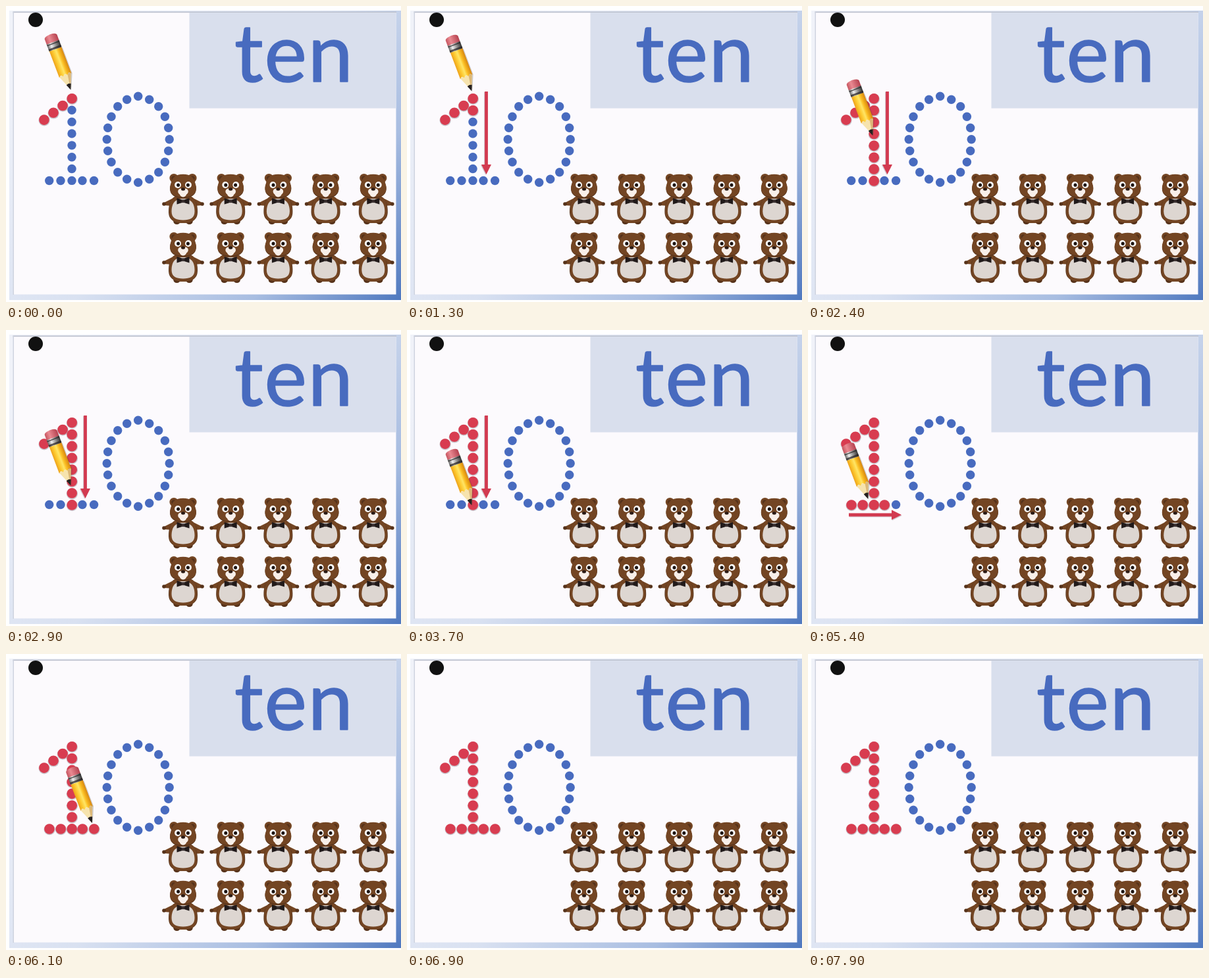
An HTML page with a canvas that plays this animation: 600 by 450 pixels, repeating every 8000 ms.

```html
<!DOCTYPE html>
<html lang="en">
<head>
<meta charset="utf-8">
<title>Writing the number ten</title>
<style>
  html, body { margin: 0; width: 100%; height: 100%; overflow: hidden; background: #fff; }
  canvas { display: block; width: 600px; height: 450px; }
</style>
</head>
<body>
<canvas id="stage"></canvas>
<script>
const W = 600, H = 450, LOOP = 8000;
const BLUE = '#486bbf', RED = '#d83c50', BROWN = '#734523', DARK = '#56321a';
const canvas = document.getElementById('stage');
const dpr = window.devicePixelRatio || 1;
canvas.width = W * dpr;
canvas.height = H * dpr;
const ctx = canvas.getContext('2d');

const clamp = v => Math.min(1, Math.max(0, v));
const span = (t, a, b) => clamp((t - a) / (b - a));
const smooth = p => (1 - Math.cos(Math.PI * p)) / 2;

function oval(c, x, y, rx, ry, fill) {
  c.fillStyle = fill;
  c.beginPath();
  c.ellipse(x, y, rx, ry, 0, 0, Math.PI * 2);
  c.fill();
}

function poly(c, fill, ...pts) {
  c.fillStyle = fill;
  c.beginPath();
  pts.forEach(([x, y]) => c.lineTo(x, y));
  c.closePath();
  c.fill();
}

function ramp(c, x0, y0, x1, y1, ...stops) {
  const g = c.createLinearGradient(x0, y0, x1, y1);
  stops.forEach(([p, col]) => g.addColorStop(p, col));
  return g;
}

// Dots of the digit 1; "on" is when a dot turns red
const one = [];
for (let i = 0; i < 4; i++) one.push({ x: 57.7 + 14.1 * i, y: 172.6 - 10.8 * i, on: 0 });
for (let i = 0; i < 7; i++) one.push({ x: 100, y: 158.3 + 17.85 * i, on: 1200 + 170 * i });
[65.7, 83, 116, 133.6].forEach((x, i) =>
  one.push({ x, y: 265.5, on: i ? 4900 + 170 * i : 4400 }));

// One quarter of the digit 0, mirrored both ways
const quarter = [[0, 65.5], [17, 60.5], [31, 50], [40.7, 34.5], [46, 17.5], [47.5, 0]];

function blueDot(c, x, y) { oval(c, x, y, 6.7, 6.7, BLUE); }

function redDot(c, x, y) {
  oval(c, x + .4, y + 1.4, 8.6, 8.4, 'rgba(70,60,80,.28)');
  oval(c, x + .2, y + .5, 7.8, 7.8, RED);
}

// Pear: narrow shoulders of half-width a at the top, half-width b below
function pear(c, top, bottom, a, b, fill) {
  const h = bottom - top;
  c.fillStyle = fill;
  c.beginPath();
  c.moveTo(0, top);
  c.bezierCurveTo(a, top, b, top + h * .25, b, top + h * .6);
  c.bezierCurveTo(b, top + h * .9, b * .6, bottom, 0, bottom);
  c.bezierCurveTo(-b * .6, bottom, -b, top + h * .9, -b, top + h * .6);
  c.bezierCurveTo(-b, top + h * .25, -a, top, 0, top);
  c.fill();
}

function bear(c, x, y) {
  c.save();
  c.translate(x, y);
  c.lineCap = 'round';
  for (const s of [-1, 1]) {
    oval(c, s * 9.5, 73.5, 5.2, 4.6, DARK);
    poly(c, BROWN, [s * 10, 37], [s * 16, 38.5], [s * 28, 44.5], [s * 29, 49], [s * 16, 50]);
    oval(c, s * 29, 47, 2.8, 2.8, DARK);
    oval(c, s * 14, 7.5, 6.6, 6.6, BROWN);
    oval(c, s * 14.2, 7.8, 3.6, 3.6, DARK);
  }
  pear(c, 33, 76, 17, 22, DARK);
  pear(c, 33, 76, 18, 21.2, BROWN);
  pear(c, 39, 71.5, 13, 17.5, '#ddd6d1');

  // Broad-cheeked head with a shaded lower rim
  for (const [dy, fill] of [[0, DARK], [-1.3, BROWN]]) {
    c.fillStyle = fill;
    c.beginPath();
    c.moveTo(0, 3 + dy);
    c.bezierCurveTo(12, 3 + dy, 17, 9 + dy, 18.5, 17 + dy);
    c.bezierCurveTo(22, 26 + dy, 20, 38 + dy, 0, 38 + dy);
    c.bezierCurveTo(-20, 38 + dy, -22, 26 + dy, -18.5, 17 + dy);
    c.bezierCurveTo(-17, 9 + dy, -12, 3 + dy, 0, 3 + dy);
    c.fill();
  }
  for (const s of [-1, 1]) {
    oval(c, s * 8, 18, 4.9, 4.9, '#fff');
    oval(c, s * 7.4, 18.2, 2.5, 2.6, '#1e1512');
    oval(c, s * 3.2, 28, 4.6, 4.6, '#f8efe9');
  }
  oval(c, 0, 31, 5.4, 5.4, '#f8efe9');
  oval(c, 0, 24.5, 3, 2.2, '#2a1a14');
  poly(c, '#211a1a', [-9.5, 38], [0, 41], [9.5, 38], [9.5, 47.5], [0, 44.5], [-9.5, 47.5]);
  oval(c, 0, 42.7, 2.5, 2.5, '#3a3030');
  c.restore();
}

// Everything that never changes, drawn once
function backdrop() {
  const layer = document.createElement('canvas');
  layer.width = canvas.width;
  layer.height = canvas.height;
  const c = layer.getContext('2d');
  c.scale(dpr, dpr);
  c.fillStyle = '#fff';
  c.fillRect(0, 0, W, H);
  c.fillStyle = ramp(c, 90, 0, 600, 447,
    [0, '#f0f2f9'], [.45, '#d9e1f1'], [.75, '#a8bde1'], [1, '#4f78bf']);
  c.fillRect(5, 7, 595, 440);
  c.fillStyle = '#bcc1ce';
  c.fillRect(10.5, 8.5, 582.5, 2);
  c.fillStyle = '#cfd4e0';
  c.fillRect(10.5, 8.5, 1.5, 430.5);
  c.fillStyle = '#fcfafd';
  c.fillRect(12, 10.3, 580.5, 428.2);
  c.fillStyle = '#d9dfed';
  c.fillRect(278.5, 10, 314, 145.5);

  c.font = '122px Lato, "Open Sans", sans-serif';
  c.letterSpacing = '2px';
  c.fillStyle = c.strokeStyle = BLUE;
  c.lineWidth = 1.6;
  c.lineJoin = 'round';
  const left = 349 + c.measureText('ten').actualBoundingBoxLeft;
  c.fillText('ten', left, 114.5);
  c.strokeText('ten', left, 114.5);

  oval(c, 45, 21, 11, 11, '#111');

  quarter.forEach(([dx, dy]) => {
    for (const sx of dx ? [-1, 1] : [1])
      for (const sy of dy ? [-1, 1] : [1]) blueDot(c, 200.7 + sx * dx, 202.7 + sy * dy);
  });
  for (let r = 0; r < 2; r++)
    for (let k = 0; k < 5; k++) bear(c, 269 + 72.2 * k, 254 + 89 * r);
  return layer;
}

// Arrow along +x, revealed by a soft-edged wipe
function arrow(x, y, angle, len, p) {
  if (p <= 0) return;
  ctx.save();
  ctx.translate(x, y);
  ctx.rotate(angle);
  const edge = p * (len + 14);
  const wipe = rgb => ramp(ctx, edge - 14, 0, edge, 0, [0, `rgba(${rgb},1)`], [1, `rgba(${rgb},0)`]);
  const shape = [[0, -2.4], [len - 15, -2.4], [len - 15, -7.5], [len, 0],
    [len - 15, 7.5], [len - 15, 2.4], [0, 2.4]];
  ctx.globalAlpha = .25;
  poly(ctx, wipe('90,60,80'), ...shape.map(([a, b]) => [a + .8, b + 1.2]));
  ctx.globalAlpha = 1;
  poly(ctx, wipe('210,58,80'), ...shape);
  ctx.restore();
}

// Pencil with its tip at (x, y); the local axis runs up from the tip
function pencil(x, y) {
  ctx.save();
  ctx.translate(x, y);
  ctx.rotate(-.36);
  poly(ctx, 'rgba(70,60,50,.25)', [1, 1], [11, -22], [11, -64], [8, -64]);

  poly(ctx, '#f6e3ae', [0, 0], [-9.8, -24], [9.8, -24]);
  poly(ctx, '#dcb878', [0, 0], [4, -24], [9.8, -24]);
  poly(ctx, '#25201f', [0, 1], [-3.7, -8], [0, -9], [3.7, -8]);

  ctx.fillStyle = ramp(ctx, -9.8, 0, 9.8, 0, [0, '#eda21c'], [.25, '#fdc92f'],
    [.5, '#ffe566'], [.68, '#fbbf24'], [1, '#d8860e']);
  ctx.beginPath();
  ctx.moveTo(-9.8, -66);
  ctx.lineTo(-9.8, -22);
  ctx.quadraticCurveTo(-6.5, -27, -3.5, -22);
  ctx.quadraticCurveTo(0, -27, 3.5, -22);
  ctx.quadraticCurveTo(6.5, -27, 9.8, -22);
  ctx.lineTo(9.8, -66);
  ctx.fill();

  ctx.fillStyle = ramp(ctx, -10, 0, 10, 0, [0, '#666'], [.3, '#eee'], [.6, '#999'], [1, '#333']);
  ctx.fillRect(-10, -77, 20, 12);
  ctx.fillStyle = 'rgba(35,30,30,.7)';
  ctx.fillRect(-10, -75, 20, 1.6);
  ctx.fillRect(-10, -68.5, 20, 3);

  ctx.fillStyle = ramp(ctx, -10, 0, 10, 0, [0, '#c65560'], [.35, '#ea8a92'], [1, '#b5414f']);
  ctx.beginPath();
  ctx.moveTo(-10, -76.5);
  ctx.lineTo(-10, -85);
  ctx.quadraticCurveTo(-9.5, -88.5, 0, -89);
  ctx.quadraticCurveTo(9.5, -88.5, 10, -85);
  ctx.lineTo(10, -76.5);
  ctx.fill();
  ctx.restore();
}

const scene = backdrop();

function draw(t) {
  ctx.setTransform(1, 0, 0, 1, 0, 0);
  ctx.drawImage(scene, 0, 0);
  ctx.scale(dpr, dpr);

  one.forEach(d => (t >= d.on ? redDot : blueDot)(ctx, d.x, d.y));

  if (t < 4000) arrow(120.5, 130, Math.PI / 2, 126, span(t, 300, 800));
  else if (t < 6050) arrow(62, 281, 0, 80, span(t, 4350, 4850));

  if (t < 4000) pencil(98, 126.5 + 139 * smooth(span(t, 1100, 3700)));
  else if (t >= 4250 && t < 6500) pencil(60.5 + 70 * smooth(span(t, 4850, 6050)), 256);
}

const start = performance.now();
function tick() {
  draw((performance.now() - start) % LOOP);
  requestAnimationFrame(tick);
}
tick();
</script>
</body>
</html>
```
